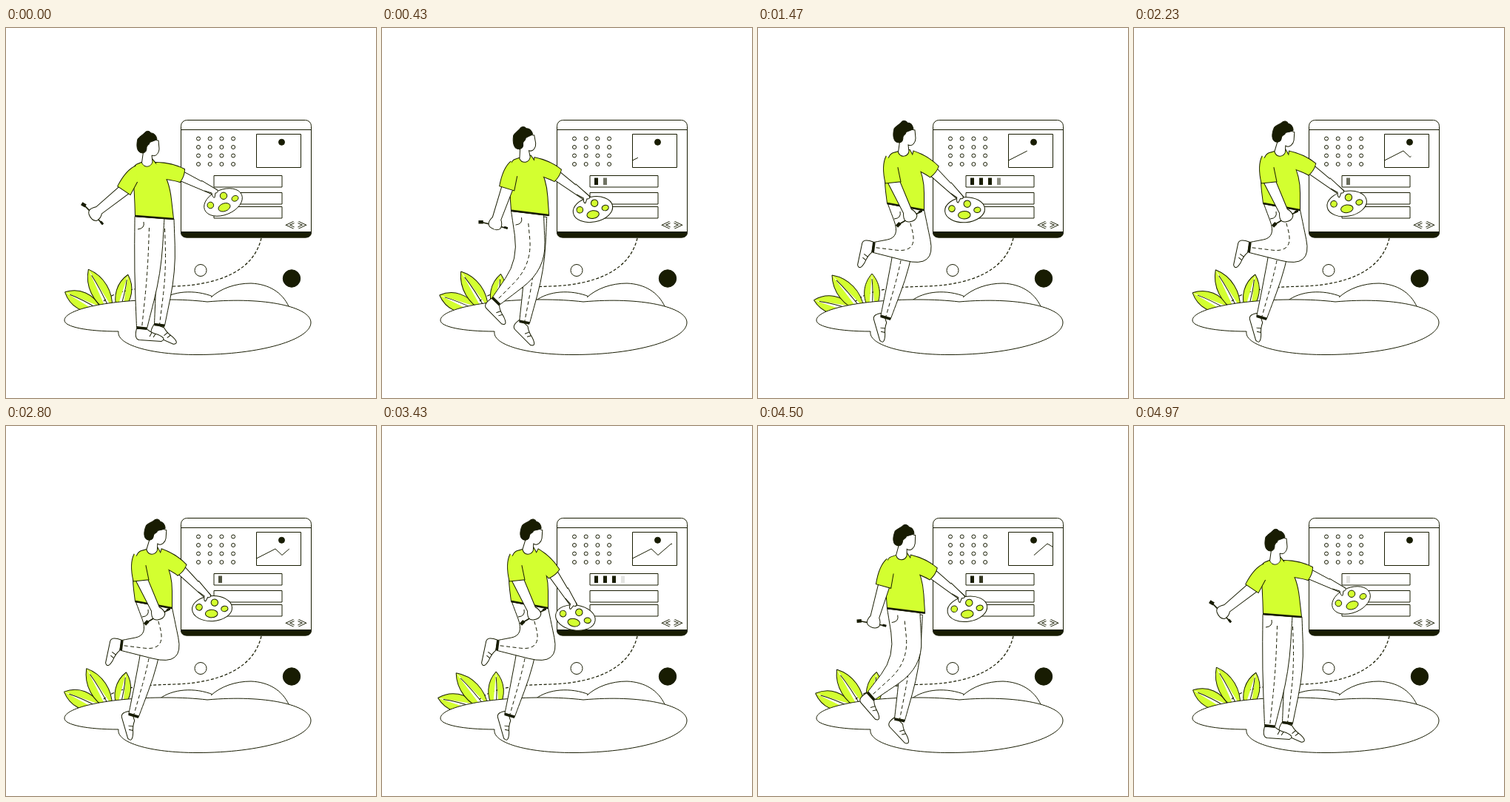
Recreate the animation shown at these times as an HTML page with a canvas. Size 500x500 px, loop 5000 ms.

```html
<!DOCTYPE html>
<html lang="en">
<head>
<meta charset="utf-8">
<title>Designer at work</title>
<style>
html, body { margin: 0; height: 100%; overflow: hidden; background: #fff; }
canvas { display: block; width: 100vw; height: 100vh; }
</style>
</head>
<body>
<canvas id="stage" width="500" height="500"></canvas>
<script>
const c = document.getElementById('stage').getContext('2d');
const INK = '#181c02', LIME = '#d3ff30', WHITE = '#fff', LINE = 1, LOOP = 5000;
const rad = d => d * Math.PI / 180;
const mix = (a, b, k) => a + (b - a) * k;
const ease = x => x * x * (3 - 2 * x);
const ramp = (t, from, to) => Math.min(1, Math.max(0, (t - from) / (to - from)));
const along = ([x, y], deg, len) => [x + len * Math.cos(rad(deg)), y + len * Math.sin(rad(deg))];
const mid = (a, b) => [(a[0] + b[0]) / 2, (a[1] + b[1]) / 2];

// Eased value of a list of [time, value] keys.
function track(t, keys) {
  let i = 1;
  while (i < keys.length - 1 && t > keys[i][0]) i++;
  const [t0, a] = keys[i - 1], [t1, b] = keys[i];
  return mix(a, b, ease(ramp(t, t0, t1)));
}

function paint(path, fill, width = LINE, dash = []) {
  const p = typeof path === 'string' ? new Path2D(path) : path;
  if (fill) { c.fillStyle = fill; c.fill(p); }
  if (width) {
    c.strokeStyle = INK;
    c.lineWidth = width;
    c.setLineDash(dash);
    c.stroke(p);
  }
}

function disc(x, y, rx, ry = rx, fill = WHITE, turn = 0) {
  const p = new Path2D();
  p.ellipse(x, y, rx, ry, rad(turn), 0, 7);
  paint(p, fill);
}

function box(x, y, w, h, r = 0) {
  const p = new Path2D();
  p.roundRect(x, y, w, h, r);
  paint(p, WHITE);
}

// Draws in a frame turned about a point; origin is that point in the drawing's own units.
function at([x, y], deg, draw, [ox, oy] = [0, 0]) {
  c.save();
  c.translate(x, y);
  c.rotate(rad(deg));
  c.translate(-ox, -oy);
  draw();
  c.restore();
}

// Smooth closed outline; a point given twice becomes a corner.
function outline(pts) {
  const path = new Path2D(), n = pts.length;
  path.moveTo(...mid(pts[n - 1], pts[0]));
  pts.forEach((p, i) => path.quadraticCurveTo(...p, ...mid(p, pts[(i + 1) % n])));
  path.closePath();
  return path;
}

// Pose: 0 = standing, 1 = hopping on one leg.
let pose = 0;
const by = (stand, hop) => mix(stand, hop, pose);
const spot = (x, y, hopX, hopY) => [by(x, hopX), by(y, hopY)];

function leaf(x, angle, len, width) {
  at([x, 380], angle, () => {
    const side = s => `M0 ${4 * s}C${len * 0.3} ${width * s} ${len * 0.7} ${width * s} ${len} 0`;
    paint(side(1) + side(-1).replace('M0', 'L0'), LIME, 0);
    paint(side(1) + side(-1));
    paint(`M0 0Q${len / 2} 2 ${len * 0.85} 0`);
  });
}

function scenery(t) {
  paint('M207 369C225 355 255 353 280 363');
  paint('M277 364C290 352 310 345 331 345C355 346 373 357 382 376', WHITE);
  paint('M345 284C335 327 290 347 228 349C190 350 152 352 132 369', null, 1.2, [4, 2.5]);

  const sway = -13 * track(t % 2500, [[0, 0], [1000, 1], [1500, 1], [2400, 0]]);
  leaf(125, 207 + sway, 51, 15);
  leaf(140, 242 + sway, 61, 15);
  leaf(154, 283 + sway, 48, 13);

  paint('M152 410C110 410 79 404 79 395C79 380 140 367 215 367C237 367 255 368 272 370' +
    'C350 363 412 377 412 398C412 421 345 441.5 258 441.5C195 441.5 149 428 152 410Z', WHITE);
  disc(263, 327.5, 8);
  disc(386, 338.5, 11.7, 11.7, INK);
}

function browser(t) {
  box(236.5, 124.5, 176, 158.5, 8);
  paint('M236.5 137.5H412.5');
  paint('M236.5 275.5H412.5V276C412.5 281 409 283 405 283H244C240 283 236.5 281 236.5 276Z', INK);
  for (let i = 0; i < 16; i++) disc(260 + i % 4 * 15.7, 149.5 + (i >> 2) * 11.5, 2.5);
  box(338.5, 143.5, 60, 45);
  disc(372.5, 154.3, 4, 4, INK);
  for (const y of [199.5, 222.5, 241.5]) box(281, y, 92, 15.5);

  const chevrons = 'M389 262.5L381 266.2L389 270M395 262.5L403 266.2L395 270';
  paint(chevrons, null, 3.2);
  c.strokeStyle = WHITE;
  c.lineWidth = 1.4;
  c.stroke(new Path2D(chevrons));

  const size = 75;
  const from = size * ramp(t, 3990, 4930), to = size * ramp(t, 0, 3900);
  if (to > from) {
    c.lineDashOffset = -from;
    paint('M338.5 179L364 166L373 174.5L391 159L398.5 163.5', null, LINE, [to - from, 999]);
    c.lineDashOffset = 0;
  }

  const beat = t % 2600, step = 267;
  c.fillStyle = INK;
  for (let i = 0; i < 4; i++) {
    const rise = ramp(beat, i * step, (i + 1) * step);
    const fall = ramp(beat, (8 - i) * step, (9 - i) * step);
    c.globalAlpha = rise * (1 - fall);
    c.fillRect(287 + i * 12, 202.5, 5, 9.5);
  }
  c.globalAlpha = 1;
}

// A trouser leg from hip to ankle: half widths, and the angle and length of both bones.
function leg(hip, wide, kneeWide, thigh, thighLen, shin, shinLen, shoe) {
  const knee = along(hip, thigh, thighLen), ankle = along(knee, shin, shinLen);
  const kneeReach = kneeWide / Math.cos(rad((shin - thigh) / 2));
  const side = s => [
    along(hip, by(4, 10), s * wide),
    along(knee, (thigh + shin) / 2 - 90, s * kneeReach),
    along(ankle, shin - 90, s * 7)
  ];
  const [hipF, kneeF, ankleF] = side(1), [hipB, kneeB, ankleB] = side(-1);

  at(ankle, shoe, () => {
    paint('M-7 1Q-10 15 -3 16L27 17Q35 13 22 8Q13 6 7 1Z', WHITE);
    paint('M11 11L14 5M16 12L19 7');
  });
  paint(outline([hipF, hipF, kneeF, ankleF, ankleF, ankleB, ankleB, kneeB, hipB, hipB]), WHITE);
  paint(`M${ankleF}L${ankleB}`, null, 3.6);
  const bend = mid(knee, ankle);
  paint(`M${along(hip, thigh, 14)}L${mid(hip, knee)}Q${knee} ${bend}L${ankle}`, null, LINE, [5, 3.5]);
}

function legs() {
  leg(spot(214, 257, 204, 250), 13, 13, by(88, 99), 71, by(97, 106), 74, by(22, 72));
  const hip = spot(194, 256, 200, 242);
  leg(hip, by(20, 25), 18, by(92, 75), by(74, 64), by(96, 187), by(76, 61), by(2, 100));
  at(hip, 0, () => paint('M-8 6Q-6 15 -16 16'));
}

function paletteArm() {
  paint('M238 193L286 219L279 225L234 206Z', WHITE);
  disc(293.5, 235.5, 27, 17, WHITE, -22);
  disc(276.3, 239.5, 4.3, 4.3, LIME);
  disc(294, 226.8, 4.7, 4.7, LIME);
  disc(309.5, 230.3, 4.6, 3.7, LIME, -25);
  disc(295, 242.3, 8.3, 5.3, LIME, -20);
  paint('M264 206L284 218C288 220 286 223 283 223L282 229C280 230 279 227 278 223L268 220', WHITE);
}

function head() {
  paint('M186 164L183.5 182C187 190 196 188 198 181L197 172C203 175 207 168 207 163L206 152L195 150Z', WHITE);
  paint('M185 169C176 169 176 158 178 150C180 147 184 145 187 142C190 138 194 139 196 142C201 142 203 146 204 150' +
    'C201 153 196 153 194 155C194 158 191 158 190 161C190 166 189 168 185 169Z', INK);
}

function brushArm() {
  const shoulder = spot(176, 196, 180, 180), lift = by(124, 84);
  at(along(shoulder, lift, 26), by(140, 64), () => {
    paint('M57 21L54 -17', null, 1.6);
    paint('M58 23L56 17', null, 4.5);
    paint('M54 -12V-17', null, 3);
    paint('M-3 8L46 7Q57 13 60 5Q63 -4 57 -8Q51 -9 46 -5L-3 -8Z', WHITE);
  });
  at(shoulder, lift, () => paint('M-8 6Q4 14 29 11L29 -10L9 -8', LIME));
}

function man(t) {
  legs();
  const reach = track(t, [[0, 0], [900, 23.5], [2150, 11.5], [3850, 34.5], [4967, 0]]);
  const atShoulder = draw => at(spot(205, 186, 211, 171), reach, draw, [205, 186]);
  const sleeve = 'M203 182C212 182 228 184 241 191C241 198 238 204 235 208C229 206 222 205 216 204L204 196Z';
  const waistL = spot(175, 254, 175, 237), waistR = spot(226, 258, 224, 246);
  const neckL = spot(183, 182, 190, 167), neckR = spot(198, 178, 205, 165);
  const torso = outline([
    neckL, neckL, spot(171, 187, 176, 171), spot(174, 222, 171, 205),
    waistL, waistL, waistR, waistR, spot(220, 205, 224, 200), neckR, neckR
  ]);
  atShoulder(paletteArm);

  // Outlines first, fills after, so that sleeve and torso merge.
  atShoulder(() => paint(sleeve, null, 2 * LINE));
  paint(torso, null, 2 * LINE);
  atShoulder(() => paint(sleeve, LIME, 0));
  paint(torso, LIME, 0);
  paint(`M${waistL}L${waistR}`, null, 2.6);

  const nod = track(t, [[0, 0], [750, -8], [2250, 9], [3430, 9], [4150, 12], [4967, 0]]);
  at(spot(191, 184, 197, 170), nod, head, [191, 184]);
  brushArm();
}

function frame(t) {
  pose = track(t, [[0, 0], [960, 1], [3990, 1], [4960, 0]]);
  c.fillStyle = WHITE;
  c.fillRect(0, 0, 500, 500);
  scenery(t);
  browser(t);
  man(t);
}

const start = performance.now();
function loop() {
  frame((performance.now() - start) % LOOP);
  requestAnimationFrame(loop);
}
loop();
</script>
</body>
</html>
```
